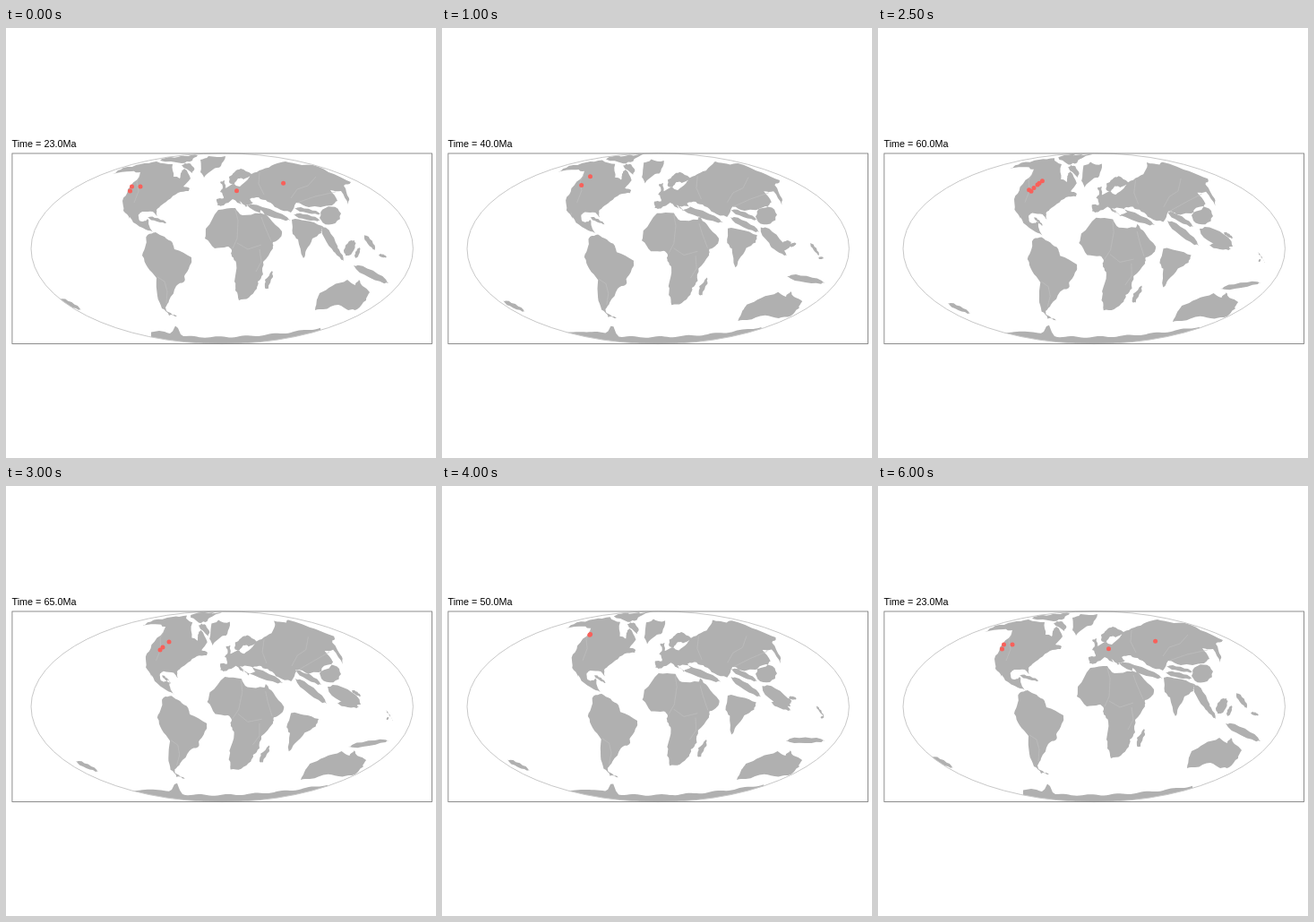
An HTML page for the animation above (6500 ms loop, 480 by 480 pixels).

```html
<!DOCTYPE html>
<html lang="en">
<head>
<meta charset="utf-8">
<title>Continents through time</title>
<style>
html, body { margin: 0; width: 100%; height: 100%; overflow: hidden; background: #fff; }
svg { display: block; width: 480px; height: 480px; }
text { font: 10.8px "Liberation Sans", Arial, sans-serif; }
</style>
</head>
<body>
<svg viewBox="0 0 480 480">
  <defs><clipPath id="globe"><ellipse cx="241.2" cy="246.2" rx="213.2" ry="106.4"/></clipPath></defs>
  <text id="label" x="6.5" y="133"></text>
  <g clip-path="url(#globe)">
    <path id="land" fill="#b0b0b0"/>
    <path id="seams" fill="none" stroke="#c2c2c2" stroke-width=".6"/>
  </g>
  <ellipse cx="241.2" cy="246.2" rx="213.2" ry="106.4" fill="none" stroke="#c8c8c8"/>
  <rect x="6.9" y="140" width="468.6" height="212.5" fill="none" stroke="#808080" stroke-width=".9"/>
  <g id="dots" fill="#f8605a"></g>
</svg>
<script>
const CX = 241.2, CY = 246.2, RX = 213.2, RY = 106.4, TURN = 2 * Math.PI;
const STEP = 500, AGES = [23, 30, 40, 45, 50, 60, 65];

// Fossil sites for each age
const SITES = [
  '140.5,177 150,177 138.5,182 257.5,181.7 309.6,173.2',
  '144,178 155,172',
  '165.5,165.8 155.7,175.5',
  '163,167',
  '165.6,165.5 164.8,166.2',
  '168.6,180.8 171,182.3 174,178.5 178,175 180,173.3 183.4,170.8',
  '172,183 175,180 182,174'
];

// Rigid plates: outlines at 23 Ma; two anchors move between from (23 Ma) and to (60 Ma)
const PLATES = [
  { from: [131, 192, 205, 180], to: [153, 190, 222, 186], ease: 1.3,
    shapes: [
      '119,163 131,156 150,152 168,149 186,152 187,166 194,168 195,162 199,157 206,168 198,177 205,179 204,182 192,184 181,192 172,199 168,203 169,210 164,205 152,205 148,208 149,215 153,216 158,213 160,221 166,229 156,225 142,217 135,204 138,213 131,204 130,193 136,180 149,166 150,161 140,160',
      '172,148 184,144 200,143 214,142 208,148 196,151',
      '196,153 204,151 210,156 208,162'
    ],
    seams: ['150,163 146,172 148,182 143,195'] },
  { from: [244, 143, 222, 166], to: [250, 151, 231, 178], ease: .7,
    shapes: ['217,147 226,143 245,143 240,154 231,158 221,167 217,161'] },
  { from: [152, 252, 207, 258], to: [167, 256, 222, 266], ease: 1,
    shapes: ['158,231 167,228 177,233 186,240 188,247 207,256 207,262 200,275 199,283 190,288 182,304 178,312 181,317 191,322 182,321 174,313 169,299 168,279 158,267 152,254 156,242'],
    seams: ['169,278 177,283 180,294 179,307'] },
  { from: [222, 230, 258, 303], to: [225, 235, 250, 314], ease: 1,
    shapes: [
      '237,203 256,201 264,209 283,207 284,203 294,212 308,227 306,234 298,239 298,246 287,261 287,275 281,283 280,291 271,301 260,304 256,293 255,283 257,263 252,255 252,248 247,244 233,246 222,235 223,224',
      '289,290 289,281 297,271 298,278 293,291'
    ],
    seams: ['256,203 259,215 258,235 253,246', '285,211 289,222 296,238', '258,240 270,247 285,242', '283,247 285,261 279,272'] },
  { from: [236, 197, 382, 188], to: [240, 202, 372, 187], ease: 1,
    shapes: [
      '236,198 235,191 243,190 241,183 253,174 261,177 270,169 274,163 286,158 300,152 312,149 326,152 343,153 366,163 385,172 377,176 383,190 382,197 374,182 362,181 370,193 364,198 338,200 324,195 318,206 303,201 292,194 282,189 272,191 276,195 268,200 260,193 264,198 253,191 243,198',
      '249,172 249,166 255,161 262,157 274,163 265,169 259,168 255,174',
      '239,183 242,178 239,172 244,170 247,181'
    ],
    seams: ['283,161 282,174 288,186', '318,190 325,180 337,176 346,166', '325,195 345,188 368,183'] },
  { from: [321, 217, 332, 256], to: [319, 246, 318, 292], ease: 1.5,
    shapes: ['319,214 334,215 353,221 352,229 342,235 335,248 332,257 326,236 320,230'] },
  { from: [345, 315, 406, 295], to: [329, 328, 402, 306], ease: .25,
    shapes: ['347,303 350,296 364,288 381,281 390,287 394,281 398,288 406,295 402,304 392,314 382,315 371,309 354,314 345,315'] }
];

// Thin slivers and islands: ends and width at 23 Ma, then at 60 Ma
const SLIVERS = [
  [268, 197, 318, 215, 7, 261, 201, 309, 220, 8],
  [322, 201, 352, 208, 4, 323, 205, 352, 222, 6],
  [321, 208, 351, 215, 5, 323, 215, 358, 243, 8],
  [350, 212, 374, 207, 20, 350, 209, 374, 210, 20],
  [353, 221, 370, 252, 9, 359, 224, 396, 244, 15],
  [361, 238, 377, 260, 5, 370, 242, 394, 247, 5],
  [379, 254, 389, 237, 10, 376, 238, 391, 241, 7],
  [390, 257, 395, 245, 4, 386, 228, 396, 235, 3],
  [388, 265, 427, 285, 8, 382, 291, 428, 284, 5],
  [400, 231, 412, 248, 5, 424, 250, 432, 262, 0],
  [416, 253, 425, 256, 3, 425, 261, 427, 258, 2],
  [60, 302, 84, 315, 4, 78, 307, 103, 319, 4],
  [158, 211, 180, 218, 3, 174, 211, 184, 221, 2]
];

const $ = id => document.getElementById(id);
const parse = s => s.split(' ').map(p => p.split(',').map(Number));
const lerp = (a, b, t) => a + (b - a) * t;
const mix = (a, b, t) => a.map((v, i) => lerp(v, b[i], t));
const unit = v => { const l = Math.hypot(...v); return v.map(c => c / l); };
const cross = (a, b) => [a[1] * b[2] - a[2] * b[1], a[2] * b[0] - a[0] * b[2], a[0] * b[1] - a[1] * b[0]];
const dot = (a, b) => a[0] * b[0] + a[1] * b[1] + a[2] * b[2];
const clamp = (v, lo, hi) => Math.max(lo, Math.min(hi, v));
const bump = (x, mid, w) => Math.exp(-(((x - mid) / w) ** 2));

// Share of the way moved: above 1 starts slowly, below 1 settles early
function progress(age, ease) {
  const u = (age - 23) / 37;
  return ease < 1 ? 1 - (1 - Math.min(u, 1)) ** (1 / ease) : u ** ease;
}

// Splits every coast segment at a seeded, slightly displaced midpoint
function ragged(pts, depth = 2) {
  if (!depth) return pts;
  const out = [];
  pts.forEach((p, i) => {
    const q = pts[(i + 1) % pts.length], dx = q[0] - p[0], dy = q[1] - p[1];
    const n = Math.sin(i * 12.9 + pts.length * 7.3) * 43758.5;
    const k = (n - Math.floor(n) - .5) * Math.min(.4, 2 / Math.hypot(dx, dy));
    out.push(p, [p[0] + dx / 2 - dy * k, p[1] + dy / 2 + dx * k]);
  });
  return ragged(out, depth - 1);
}

// Mollweide projection, both ways
function toSphere([x, y]) {
  const th = Math.asin(clamp((CY - y) / RY, -.9999, .9999));
  const lat = Math.asin((2 * th + Math.sin(2 * th)) / Math.PI);
  const lon = Math.PI * (x - CX) / (RX * Math.cos(th));
  return [Math.cos(lat) * Math.cos(lon), Math.cos(lat) * Math.sin(lon), Math.sin(lat)];
}
function toStage(lon, z) {
  let lo = -Math.PI / 2, hi = -lo;
  for (let i = 0; i < 24; i++) {
    const m = (lo + hi) / 2;
    if (2 * m + Math.sin(2 * m) < Math.PI * z) lo = m; else hi = m;
  }
  return [CX + RX * lon / Math.PI * Math.cos(lo), CY - RY * Math.sin(lo)];
}

// Axes spanned by two anchor points on the sphere
function basis(pins) {
  const a = toSphere(pins.slice(0, 2)), b = toSphere(pins.slice(2));
  const u = unit(a.map((c, i) => c + b[i])), v = unit(b.map((c, i) => c - a[i]));
  return [u, v, cross(u, v)];
}

const pathOf = (pts, end = 'Z') => 'M' + pts.map(p => p[0].toFixed(1) + ' ' + p[1].toFixed(1)).join('L') + end;

// Rotates an outline on the sphere; copies one turn away cover the map edge
function drift(pts, from, to, end) {
  let last = null;
  const moved = pts.map(p => {
    const s = toSphere(p), w = from.map(axis => dot(axis, s));
    const r = [0, 1, 2].map(i => dot(w, to.map(axis => axis[i])));
    let lon = Math.atan2(r[1], r[0]);
    if (last !== null) lon -= TURN * Math.round((lon - last) / TURN);
    last = lon;
    return [lon, r[2]];
  });
  return [-1, 0, 1].map(n => pathOf(moved.map(([lon, z]) => toStage(lon + n * TURN, z)), end)).join('');
}

// Tapered strip with rough sides
function sliver([x1, y1, x2, y2, w]) {
  const len = Math.hypot(x2 - x1, y2 - y1), nx = (y1 - y2) / len, ny = (x2 - x1) / len, pts = [];
  for (let i = 0; i < 10; i++) {
    const a = i / 10 * TURN, t = .5 - Math.cos(a) / 2, side = Math.sin(a) * w / 2;
    pts.push([lerp(x1, x2, t) + nx * side, lerp(y1, y2, t) + ny * side]);
  }
  return pathOf(ragged(pts, 1));
}

function antarctica(age) {
  const t = progress(age, .25), left = lerp(162, 122, t), right = lerp(352, 360, t), pts = [];
  for (let x = left; x <= right; x += 3) {
    const y = 345 - 11 * ((x - 230) / 125) ** 2 - 12 * bump(x, 190, 4) - 4 * bump(x, 170, 14);
    pts.push([x, y + Math.sin(x * 2.3) * .8]);
  }
  return pathOf([...pts, [right, 356], [left, 356]]);
}

function build(age) {
  let land = antarctica(age), seams = '';
  for (const { from, to, ease, shapes, seams: lines = [] } of PLATES) {
    const start = basis(from), now = basis(mix(from, to, progress(age, ease)));
    for (const s of shapes) land += drift(ragged(parse(s)), start, now, 'Z');
    for (const s of lines) seams += drift(parse(s), start, now, '');
  }
  for (const s of SLIVERS) land += sliver(mix(s.slice(0, 5), s.slice(5), Math.min(1, progress(age, 1))));
  return { land, seams };
}

const maps = AGES.map(build);
let shown = -1;

function show(ms) {
  const step = Math.floor(ms / STEP) % 13, i = step < 7 ? step : 12 - step;
  if (i === shown) return;
  shown = i;
  $('label').textContent = `Time = ${AGES[i].toFixed(1)}Ma`;
  $('land').setAttribute('d', maps[i].land);
  $('seams').setAttribute('d', maps[i].seams);
  $('dots').innerHTML = parse(SITES[i]).map(([x, y]) => `<circle cx="${x}" cy="${y}" r="2.5"/>`).join('');
}

const start = performance.now();
function tick() {
  show(performance.now() - start);
  requestAnimationFrame(tick);
}
tick();
</script>
</body>
</html>
```
